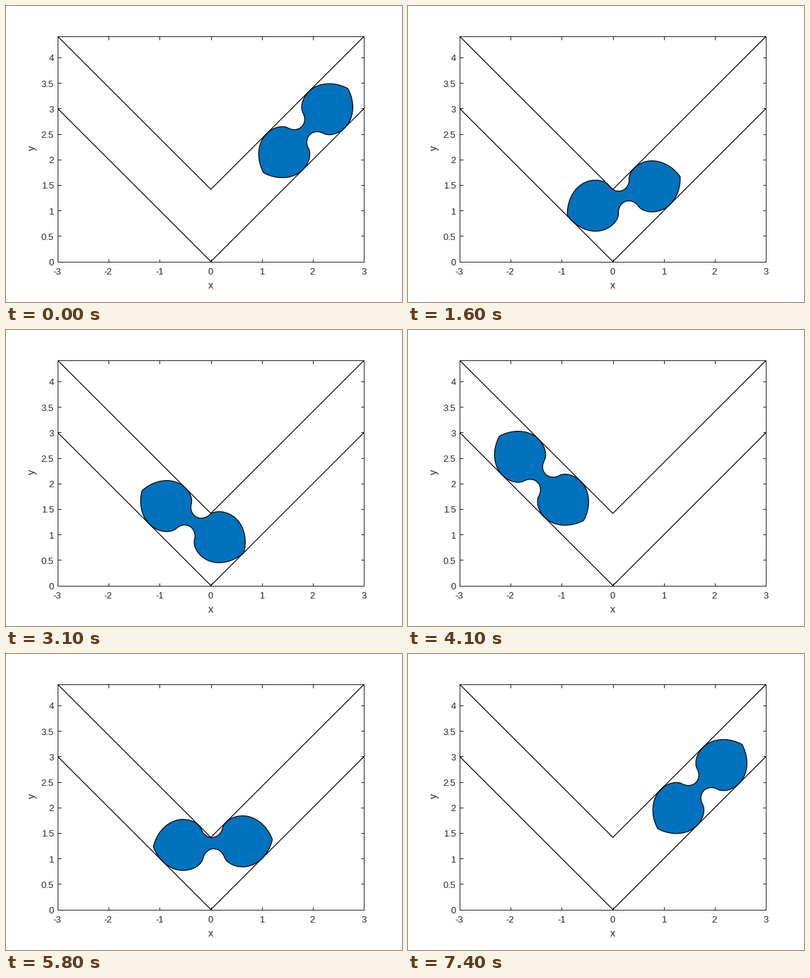
These frames come from a looping animation (560 by 420 pixels, 7500 ms). A matplotlib script:

```python
import numpy as np
import matplotlib.pyplot as plt
from matplotlib.animation import FuncAnimation
from matplotlib.patches import Polygon

W, H, DPI = 560, 420, 100
PX = 72 / DPI                     # one pixel in points
LEFT, RIGHT, TOP, BOTTOM = 73.0, 506.4, 43.0, 362.6
YMAX = 3 + np.sqrt(2)
GREY, BLUE = "#262626", "#0072BD"
PI = np.pi

# Ambidextrous moving sofa, described by its support function about the centre
BETA = np.arctan((np.cbrt(np.sqrt(2) + 1) - np.cbrt(np.sqrt(2) - 1)) / 2)
K = -2 / 3 / np.cos(BETA / 2 + 5 * PI / 8)
TIP = K * np.sin(BETA / 2 + 5 * PI / 8) / np.cos(BETA)
LOBE = 0.5 / np.sin(BETA) - TIP


def support(a):
    return np.select(
        [a < BETA, a <= PI / 2 - BETA],
        [TIP * np.cos(a), K * np.sin(a / 2 + 5 * PI / 8)],
        0.5 + LOBE * np.cos(a))


def slope(a):
    return np.select(
        [a < BETA, a <= PI / 2 - BETA],
        [-TIP * np.sin(a), K / 2 * np.cos(a / 2 + 5 * PI / 8)],
        -LOBE * np.sin(a))


def frame_vectors(a):
    mu = np.column_stack([np.cos(a), np.sin(a)])
    nu = np.column_stack([-np.sin(a), np.cos(a)])
    return mu, nu


def outer_wall(a):
    mu, nu = frame_vectors(a)
    return support(a)[:, None] * mu + slope(a)[:, None] * nu


def sofa_outline():
    t = np.linspace(PI / 4, BETA, 40)
    mu, nu = frame_vectors(t)
    neck = (support(t) - 1)[:, None] * mu + (support(PI / 2 - t) - 1)[:, None] * nu
    a = np.linspace(BETA, PI / 2, 80)
    inner = outer_wall(a) - frame_vectors(a)[0]
    outer = outer_wall(a[::-1]) * [1, -1]
    quarter = np.vstack([neck, inner, outer])
    half = np.vstack([quarter, quarter[::-1] * [1, -1]])
    return np.vstack([half, -half])


SOFA = sofa_outline()

# Time keys for half of the way: slide down the arm, turn, short rest, turn on
SLIDE, MID = 1.96, 35
KEYS = [0, 9, 17.5, 18.5, MID]
TURN = [0, 0, BETA, BETA, PI / 4]


def pose(n):
    """Outline in the hallway at step n, from 0 (right arm) to 70 (left arm)."""
    side = 1 if n <= MID else -1
    m = min(n, 2 * MID - n)
    t = np.interp(m, KEYS, TURN)
    shift = SLIDE * max(0, 1 - m / KEYS[1])
    a, b = 1 - support(t), 1 - support(PI / 2 - t)
    cx = side * (b - a + shift) / np.sqrt(2)
    cy = np.sqrt(2) + (shift - a - b) / np.sqrt(2)
    tilt = side * (PI / 4 - t)
    c, s = np.cos(tilt), np.sin(tilt)
    return SOFA @ np.array([[c, s], [-s, c]]) + [cx, cy]


fig = plt.figure(figsize=(W / DPI, H / DPI), dpi=DPI, facecolor="white")
ax = fig.add_axes([LEFT / W, 1 - BOTTOM / H, (RIGHT - LEFT) / W, (BOTTOM - TOP) / H])
ax.set(xlim=(-3, 3), ylim=(0, YMAX))
ax.set_xticks(range(-3, 4))
ax.set_yticks(np.arange(0, 4.1, 0.5))
ax.tick_params(direction="in", length=4.5 * PX, width=PX, color=GREY,
               top=True, right=True, labelbottom=False, labelleft=False)
for spine in ax.spines.values():
    spine.set(linewidth=PX, edgecolor=GREY)


def label(x, y, text, size=13, **kw):
    kw = {"ha": "center", "va": "baseline", **kw}
    fig.text(x / W, 1 - y / H, text, fontsize=size * PX, color=GREY,
             family="Liberation Sans", **kw)


for v in range(-3, 4):
    label(LEFT + (v + 3) / 6 * (RIGHT - LEFT) - 0.7, 381, str(v))
for v in np.arange(0, 4.1, 0.5):
    label(67.5, BOTTOM - v / YMAX * (BOTTOM - TOP) + 5.4, f"{v:g}", ha="right")
label(289.2, 401, "x", 14.5)
label(37, 201, "y", 14.5, rotation=90, va="center")

sofa = Polygon(pose(0), closed=True, facecolor=BLUE, edgecolor="black",
               linewidth=1.2 * PX, zorder=2)
ax.add_patch(sofa)
for y0 in (0, np.sqrt(2)):
    ax.plot([-3, 0, 3], [y0 + 3, y0, y0 + 3], color="black",
            linewidth=1.2 * PX, zorder=3)


def update(i):
    k = max(0, i - 4)
    sofa.set_xy(pose(2 * k if k <= MID else 141 - 2 * k))
    return sofa,


anim = FuncAnimation(fig, update, frames=75, interval=100,
                     repeat=True, repeat_delay=0, blit=False)
plt.show()
```
